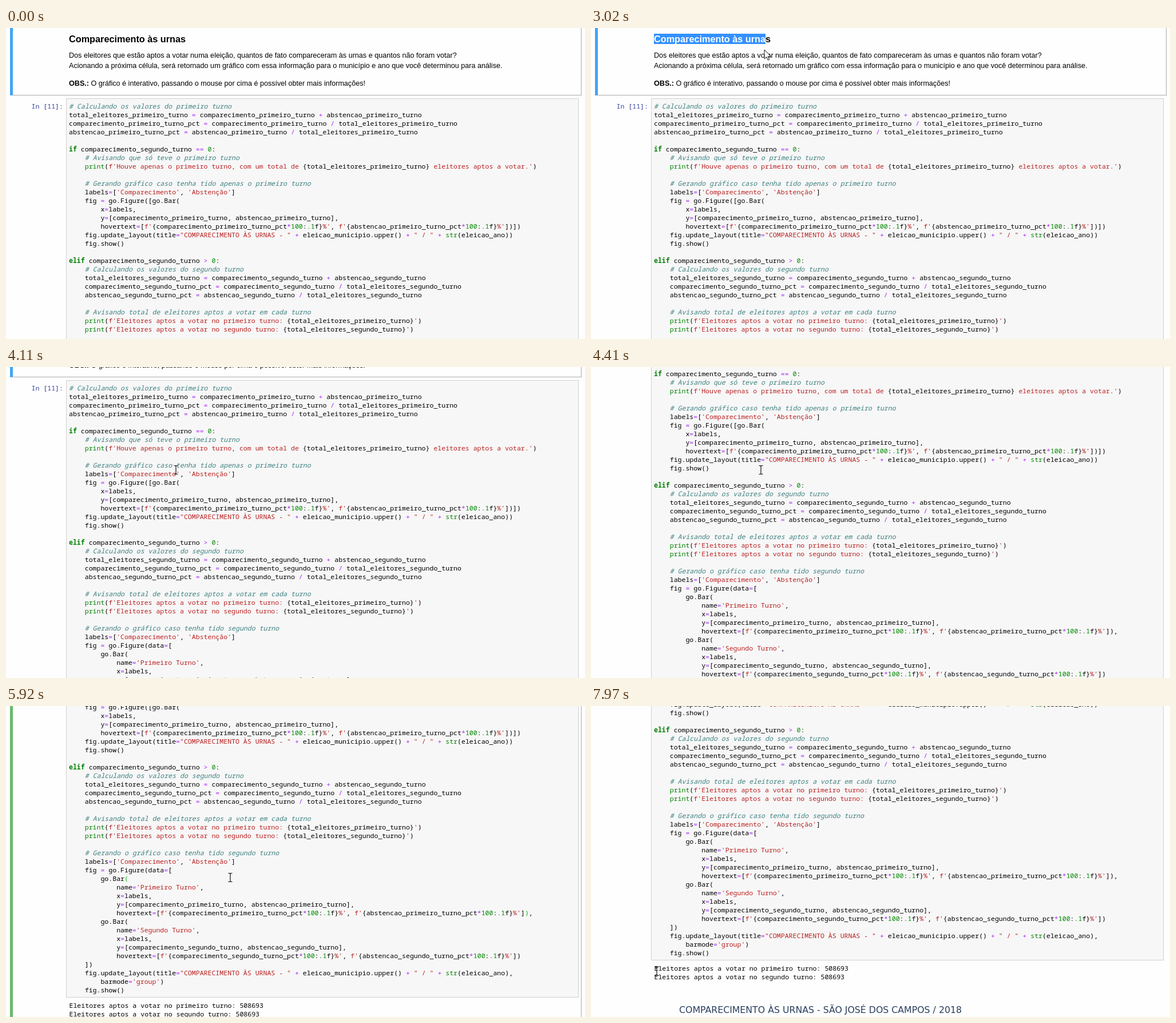
Animation of 1012 by 544 pixels, one loop 8000 ms. Source, as an HTML page:

```html
<!DOCTYPE html>
<html lang="pt">
<head>
<meta charset="utf-8">
<title>Comparecimento às urnas</title>
<style>
html, body { margin: 0; width: 100%; height: 100%; overflow: hidden; background: #fefefe; }
#stage { position: relative; width: 1012px; height: 544px; overflow: hidden; color: #000; }
#stage div, #stage pre, #stage svg { position: absolute; margin: 0; white-space: pre; box-sizing: border-box; }
#page { left: 0; top: 0; width: 1012px; height: 1400px; }
.cell { left: 7px; width: 999px; border: 1px solid #ababab; border-left: 5px solid; }
#intro { top: -40px; height: 158px; border-left-color: #42a5f5; }
#active { top: 118px; height: 1200px; border-left-color: #66bb6a; }
.text { left: 110px; font: 12.6px/18px "Liberation Sans", Arial, sans-serif; }
#title { top: 10px; font-size: 16.25px; font-weight: bold; }
#picked { background: #3390ff; color: #fff; }
.mono { font: 11.555px/15px "Noto Sans Mono", "DejaVu Sans Mono", monospace; }
#box { left: 105px; top: 123px; width: 896px; height: 687px; background: #f7f7f7; border: 1px solid #cfcfcf; }
#code { left: 110px; top: 129px; }
#code i { font-style: normal; }
#code .com { color: #408080; font-style: italic; }
#code .str { color: #ba2121; }
#code .key { color: #008000; font-weight: bold; }
#code .fn { color: #008000; }
#code .num { color: #080; }
#code .op { color: #aa22ff; }
#code.on .match { color: #0b0; }
#caret { left: 214px; top: 595px; width: 1px; height: 15px; background: #000; }
#chart { left: 154px; top: 887px; font: 15.75px/20px "DejaVu Sans", Verdana, sans-serif; color: #2a3f5f; }
#mouse { left: 0; top: 0; overflow: visible; }
</style>
</head>
<body>
<div id="stage">
  <div id="page">
    <div id="intro" class="cell"></div>
    <div id="active" class="cell"></div>
    <div id="title" class="text"><span id="picked"></span><span id="rest"></span></div>
    <div class="text" style="top:39px">Dos eleitores que estão aptos a votar numa eleição, quantos de fato compareceram às urnas e quantos não foram votar?
Acionando a próxima célula, será retornado um gráfico com essa informação para o município e ano que você determinou para análise.</div>
    <div class="text" style="top:88px"><b>OBS.:</b> O gráfico é interativo, passando o mouse por cima é possível obter mais informações!</div>
    <div class="mono" style="left:44.5px;top:129px;color:#303f9f">In [11]:</div>
    <div id="box"></div>
    <pre id="code" class="mono">
# Calculando os valores do primeiro turno
total_eleitores_primeiro_turno = comparecimento_primeiro_turno + abstencao_primeiro_turno
comparecimento_primeiro_turno_pct = comparecimento_primeiro_turno / total_eleitores_primeiro_turno
abstencao_primeiro_turno_pct = abstencao_primeiro_turno / total_eleitores_primeiro_turno

if comparecimento_segundo_turno == 0:
    # Avisando que só teve o primeiro turno
    print(f'Houve apenas o primeiro turno, com um total de {total_eleitores_primeiro_turno} eleitores aptos a votar.')

    # Gerando gráfico caso tenha tido apenas o primeiro turno
    labels=['Comparecimento', 'Abstenção']
    fig = go.Figure([go.Bar(
        x=labels,
        y=[comparecimento_primeiro_turno, abstencao_primeiro_turno],
        hovertext=[f'{comparecimento_primeiro_turno_pct*100:.1f}%', f'{abstencao_primeiro_turno_pct*100:.1f}%'])])
    fig.update_layout(title="COMPARECIMENTO ÀS URNAS - " + eleicao_municipio.upper() + " / " + str(eleicao_ano))
    fig.show()

elif comparecimento_segundo_turno > 0:
    # Calculando os valores do segundo turno
    total_eleitores_segundo_turno = comparecimento_segundo_turno + abstencao_segundo_turno
    comparecimento_segundo_turno_pct = comparecimento_segundo_turno / total_eleitores_segundo_turno
    abstencao_segundo_turno_pct = abstencao_segundo_turno / total_eleitores_segundo_turno

    # Avisando total de eleitores aptos a votar em cada turno
    print(f'Eleitores aptos a votar no primeiro turno: {total_eleitores_primeiro_turno}')
    print(f'Eleitores aptos a votar no segundo turno: {total_eleitores_segundo_turno}')

    # Gerando o gráfico caso tenha tido segundo turno
    labels=['Comparecimento', 'Abstenção']
    fig = go.Figure(data=[
        go.Bar«(»
            name='Primeiro Turno',
            x=labels,
            y=[comparecimento_primeiro_turno, abstencao_primeiro_turno],
            hovertext=[f'{comparecimento_primeiro_turno_pct*100:.1f}%', f'{abstencao_primeiro_turno_pct*100:.1f}%']«)»,
        go.Bar(
            name='Segundo Turno',
            x=labels,
            y=[comparecimento_segundo_turno, abstencao_segundo_turno],
            hovertext=[f'{comparecimento_segundo_turno_pct*100:.1f}%', f'{abstencao_segundo_turno_pct*100:.1f}%'])
    ])
    fig.update_layout(title="COMPARECIMENTO ÀS URNAS - " + eleicao_municipio.upper() + " / " + str(eleicao_ano),
        barmode='group')
    fig.show()</pre>
    <div id="caret"></div>
    <div class="mono" style="left:110.5px;top:816px">Eleitores aptos a votar no primeiro turno: 508693
Eleitores aptos a votar no segundo turno: 508693</div>
    <div id="chart">COMPARECIMENTO ÀS URNAS - SÃO JOSÉ DOS CAMPOS / 2018</div>
  </div>
  <svg id="mouse" width="20" height="20">
    <path id="beam" d="M-3.5 -7.5H-1L0 -6.5 1 -7.5H3.5M0 -6.5V6.5M-3.5 7.5H-1L0 6.5 1 7.5H3.5" fill="none" stroke="#111" stroke-width="1.2"/>
    <path id="arrow" d="M0 0V16L3.8 12.6 6.3 18.2 8.7 17.2 6.3 11.7H11.3Z" fill="#fff" stroke="#111"/>
  </svg>
</div>
<script>
const $ = id => document.getElementById(id);
const LOOP = 8000;
const HEADING = 'Comparecimento às urnas';

// [ms, value...]
const SCROLL = [[3820, 0], [4050, 100], [4130, 100], [4370, 200], [4560, 200], [4772, 300], [6500, 300], [6920, 365]];
const MOUSE = [
  [130, 925, 556], [970, 783, 527], [1300, 111, 20], [1350, 111, 20], [1800, 178, 30], [2200, 240, 38],
  [2600, 299, 11], [2700, 312, 16], [2810, 303, 27], [2985, 303, 27],
  [3020, 303, 38], [3060, 303, 38], [3650, 297, 180], [4670, 297, 180], [5350, 392, 300],
  [7180, 392, 300], [7980, 115, 464]
];

function valueAt(keys, t) {
  const next = keys.findIndex(k => k[0] > t);
  if (next < 0) return keys[keys.length - 1].slice(1);
  if (next === 0) return keys[0].slice(1);
  const a = keys[next - 1], b = keys[next];
  const p = (t - a[0]) / (b[0] - a[0]);
  const eased = p * p * (3 - 2 * p);
  return a.slice(1).map((v, i) => v + (b[i + 1] - v) * eased);
}

const tag = (name, s) => `<i class="${name}">${s}</i>`;
const TOKEN = /(#.*)|(f?'[^']*'|"[^"]*")|\b(if|elif)\b|\b(print|str)\b|(\.?\d+)|([=+\/*>-]+)/g;
const paint = source => source.replace(TOKEN, (all, com, str, key, fn, num) => {
  if (com) return tag('com', com);
  if (str) return tag('str', str.replace(/\{[^}]*\}/g, s => `</i>${paint(s)}<i class="str">`));
  return tag(key ? 'key' : fn ? 'fn' : num ? 'num' : 'op', all);
});
$('code').innerHTML = paint($('code').textContent)
  .replace(/«/g, '<i class="match">').replace(/»/g, '</i>');

// Middle of each heading letter, where a drag takes it in
const pen = document.createElement('canvas').getContext('2d');
pen.font = 'bold 16.25px "Liberation Sans", Arial, sans-serif';
const widthTo = n => pen.measureText(HEADING.slice(0, n)).width;
const middles = [...HEADING].map((c, i) => 110 + (widthTo(i) + widthTo(i + 1)) / 2);

const show = (id, on) => { $(id).style.visibility = on ? 'visible' : 'hidden'; };
const within = (t, from, to) => t >= from && t < to;

function draw(t) {
  const [scroll] = valueAt(SCROLL, t);
  const [x, y] = valueAt(MOUSE, t);
  $('page').style.transform = `translateY(${-Math.round(scroll)}px)`;
  $('mouse').style.transform = `translate(${Math.round(x)}px, ${Math.round(y)}px)`;

  const pointing = within(t, 3000, 3090);
  show('arrow', pointing);
  show('beam', t >= 130 && !pointing);

  const count = within(t, 1350, 3120) ? middles.filter(m => m < x).length : 0;
  $('picked').textContent = HEADING.slice(0, count);
  $('rest').textContent = HEADING.slice(count);

  const editing = within(t, 5380, 6500);
  show('intro', t < 5380);
  show('active', editing);
  show('caret', within(t, 5380, 5920));
  $('code').classList.toggle('on', editing);
}

const start = performance.now();
function tick() {
  draw((performance.now() - start) % LOOP);
  requestAnimationFrame(tick);
}
tick();
</script>
</body>
</html>
```
